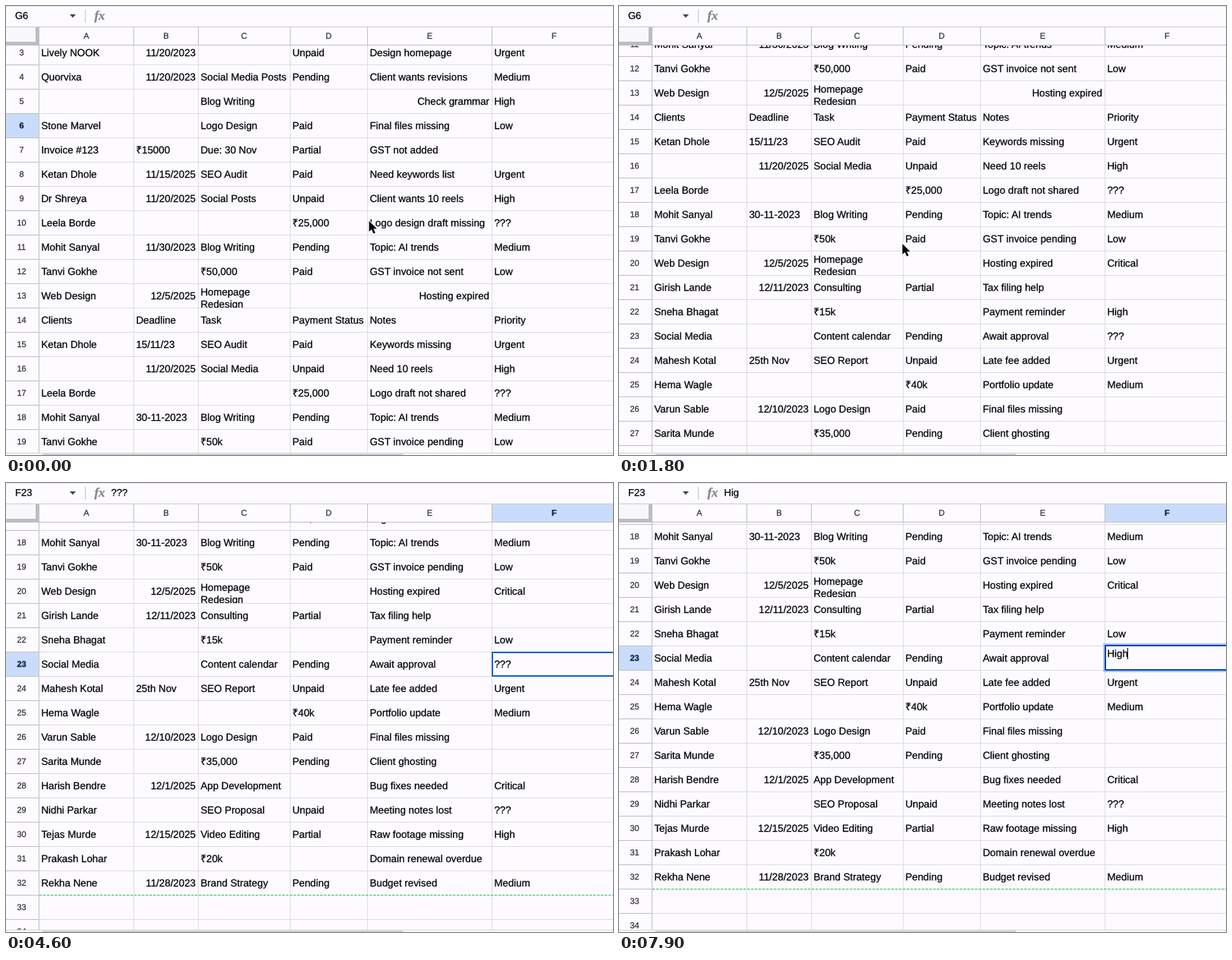
An HTML page with a canvas that plays this animation: 800 px wide and 591 px high, repeating every 8 s.

```html
<!DOCTYPE html>
<html lang="en">
<head>
<meta charset="utf-8">
<title>Client sheet</title>
<style>
  html, body { margin: 0; width: 100%; height: 100%; overflow: hidden; background: #fdfbff; }
  canvas { display: block; width: 800px; height: 591px; }
</style>
</head>
<body>
<canvas id="stage" width="800" height="591"></canvas>
<script>
const ctx = document.getElementById('stage').getContext('2d');
ctx.textRendering = 'geometricPrecision';
const W = 800, H = 591, LOOP = 8000, STEP = 100;
const ROW_H = 32, TOP = 52, BOTTOM = 588;
const SANS = '"Liberation Sans", Arial, sans-serif';
const CELL_FONT = '13.333px ' + SANS;
const BG = '#fdfbff', GRID = '#dddce0', EDGE = '#c0bfc3', ACTIVE = '#cadcfb', INK = '#000';
const edges = [43, 168, 253, 374, 476, 640, 804];

// Rows 3 and up: A | B | C | D | E | F. A leading ">" aligns right, "~" wraps.
const rows = `Lively NOOK|11/20/2023||Unpaid|Design homepage|Urgent
Quorvixa|11/20/2023|Social Media Posts|Pending|Client wants revisions|Medium
||Blog Writing||>Check grammar|High
Stone Marvel||Logo Design|Paid|Final files missing|Low
Invoice #123|₹15000|Due: 30 Nov|Partial|GST not added|
Ketan Dhole|11/15/2025|SEO Audit|Paid|Need keywords list|Urgent
Dr Shreya|11/20/2025|Social Posts|Unpaid|Client wants 10 reels|High
Leela Borde|||₹25,000|Logo design draft missing|???
Mohit Sanyal|11/30/2023|Blog Writing|Pending|Topic: AI trends|Medium
Tanvi Gokhe||₹50,000|Paid|GST invoice not sent|Low
Web Design|12/5/2025|Homepage~Redesign||>Hosting expired|
Clients|Deadline|Task|Payment Status|Notes|Priority
Ketan Dhole|15/11/23|SEO Audit|Paid|Keywords missing|Urgent
|11/20/2025|Social Media|Unpaid|Need 10 reels|High
Leela Borde|||₹25,000|Logo draft not shared|???
Mohit Sanyal|30-11-2023|Blog Writing|Pending|Topic: AI trends|Medium
Tanvi Gokhe||₹50k|Paid|GST invoice pending|Low
Web Design|12/5/2025|Homepage~Redesign||Hosting expired|Critical
Girish Lande|12/11/2023|Consulting|Partial|Tax filing help|
Sneha Bhagat||₹15k||Payment reminder|High
Social Media||Content calendar|Pending|Await approval|???
Mahesh Kotal|25th Nov|SEO Report|Unpaid|Late fee added|Urgent
Hema Wagle|||₹40k|Portfolio update|Medium
Varun Sable|12/10/2023|Logo Design|Paid|Final files missing|
Sarita Munde||₹35,000|Pending|Client ghosting|
Harish Bendre|12/1/2025|App Development||Bug fixes needed|Critical
Nidhi Parkar||SEO Proposal|Unpaid|Meeting notes lost|???
Tejas Murde|12/15/2025|Video Editing|Partial|Raw footage missing|High
Prakash Lohar||₹20k||Domain renewal overdue|
Rekha Nene|11/28/2023|Brand Strategy|Pending|Budget revised|Medium`
  .split('\n').map(line => line.split('|'));

// [time, value...]
const scrollKeys = [[0, 0], [500, 142], [900, 200], [1800, 267], [2100, 375], [2400, 463],
  [4800, 463], [5200, 467], [5600, 471]];
const mouseKeys = [[0, 478, 283], [500, 242, 291], [900, 252, 296], [1800, 373, 313], [2500, 400, 316],
  [3000, 675, 201], [4800, 678, 201], [5200, 695, 204], [5800, 696, 226], [6900, 696, 226], [7100, 697, 219]];

// [time, text in the edited cell, selected]
const edits = [
  { row: 22, from: 3400, to: 4500, keys: [[3400, 'High'], [3500, 'High', true], [4000, 'L'], [4100, 'Lo'], [4300, 'Low']] },
  { row: 23, from: 7300, to: LOOP, keys: [[7300, '???'], [7400, '???', true], [7600, 'H'], [7700, 'Hi'], [7800, 'Hig'], [7900, 'High']] }
];

function track(keys, t) {
  const i = keys.findIndex(k => k[0] > t);
  if (i < 0) return keys[keys.length - 1].slice(1);
  const a = keys[i - 1], b = keys[i], p = (t - a[0]) / (b[0] - a[0]);
  return a.slice(1).map((v, n) => v + (b[n + 1] - v) * p);
}

const latest = (keys, t) => keys.filter(k => k[0] <= t).pop() || keys[0];

function rect(x, y, w, h, color) {
  ctx.fillStyle = color;
  ctx.fillRect(x, y, w, h);
}

// A hairline stroke gives the slightly heavy, smoothed look of the sheet's type.
function text(str, x, y, font = CELL_FONT, align = 'left', color = INK) {
  ctx.font = font;
  ctx.textAlign = align;
  ctx.fillStyle = ctx.strokeStyle = color;
  ctx.lineWidth = 0.25;
  ctx.lineJoin = 'round';
  ctx.fillText(str, x, y);
  ctx.strokeText(str, x, y);
}

function clipped(x, y, w, h, draw) {
  ctx.save();
  ctx.beginPath();
  ctx.rect(x, y, w, h);
  ctx.clip();
  draw();
  ctx.restore();
}

function drawCell(value, col, bottom) {
  const left = edges[col] + 3.4, right = edges[col + 1] - 3;
  if (value.includes('~')) {
    const [first, second] = value.split('~');
    clipped(edges[col], bottom - 31, 120, 31, () => {
      text(first, left, bottom - 16);
      text(second, left, bottom);
    });
  } else if (value[0] === '>') {
    text(value.slice(1), right, bottom - 11, CELL_FONT, 'right');
  } else if (/\/20\d\d$/.test(value)) {
    text(value, right, bottom - 11, CELL_FONT, 'right');
  } else {
    text(value, left, bottom - 11);
  }
}

function drawGrid(scroll, active, edit, priority) {
  const bottomOf = n => ROW_H * n - 19 - scroll;
  for (let n = 2; n <= 36; n++) {
    const y = bottomOf(n);
    if (y < TOP - 2 || y > BOTTOM + ROW_H) continue;
    const on = n === active;
    if (on) rect(0, y - 31, 43, 31, ACTIVE);
    text(n, 20.5, y - 12, (on ? 'bold ' : '') + '11px ' + SANS, 'center', on ? '#041e49' : '#333');
    rect(0, y, 43, 1, EDGE);
    rect(43, y, W - 43, 1, GRID);
  }
  edges.slice(1, 6).forEach(x => rect(x, TOP, 1, BOTTOM - TOP, GRID));
  rect(43, TOP, 1, BOTTOM - TOP, EDGE);

  rows.forEach((cells, i) => {
    const n = i + 3, y = bottomOf(n);
    if (y < TOP || y > BOTTOM + ROW_H) return;
    cells.forEach((value, col) => {
      if (col === 5 && edit && edit.row === n) return;
      drawCell(col === 5 && n === 22 ? priority : value, col, y);
    });
  });

  const dashY = bottomOf(32);
  rect(44, dashY, W - 44, 1, BG);
  for (let x = 44; x < W; x += 5) rect(x, dashY, 3.5, 1, '#2fc25c');

  if (active > 6) drawSelection(bottomOf(active - 1), edit);
}

function drawSelection(top, edit) {
  ctx.lineWidth = 2;
  if (!edit) {
    ctx.strokeStyle = '#1b62cc';
    ctx.strokeRect(641, top + 1, 180, 31);
    return;
  }
  rect(638, top - 3, 170, 38, '#a9c8fa');
  rect(640, top - 1, 170, 34, BG);
  ctx.strokeStyle = '#0d47b5';
  ctx.strokeRect(641, top, 180, 32);
  ctx.font = CELL_FONT;
  ctx.textAlign = 'left';
  const width = ctx.measureText(edit.value).width;
  if (edit.selected) rect(643.5, top + 3, width + 1, 15, '#b4d5fd');
  text(edit.value, 643.4, top + 15);
  if (!edit.selected) rect(Math.round(643.4 + width) - 1, top + 3, 1, 15, INK);
}

function drawHeader(name, formula, columnOn) {
  rect(0, 0, W, TOP, BG);
  rect(0, 0, W, 1, '#e6e5e9');
  const bar = '13px ' + SANS;
  text(name, 12, 17, bar);
  text(formula, 138.5, 17, bar);
  ctx.fillStyle = '#444';
  ctx.beginPath();
  ctx.moveTo(84, 11);
  ctx.lineTo(92, 11);
  ctx.lineTo(88, 15.5);
  ctx.fill();
  rect(104, 5, 1, 17, '#c4c3c7');
  const fx = 'italic bold 17px "Liberation Serif", Times, serif';
  text('f', 116.5, 18, fx, 'left', '#85848a');
  text('x', 122, 18, fx, 'left', '#85848a');

  if (columnOn) rect(641, 28, 160, 23, ACTIVE);
  rect(0, 27, W, 1, '#cbcace');
  rect(0, 51, W, 1, EDGE);
  [...'ABCDEF'].forEach((letter, i) => {
    const bold = columnOn && i === 5;
    text(letter, (edges[i] + edges[i + 1]) / 2 + 0.3, 43, (bold ? 'bold ' : '') + '11px ' + SANS, 'center', bold ? '#041e49' : '#333');
    if (i) rect(edges[i], 28, 1, 24, EDGE);
  });
  rect(0, 28, 39, 19, '#f8f7fb');
  rect(39, 28, 5, 24, '#bdbcc0');
  rect(0, 47, 44, 5, '#bdbcc0');
}

function drawFooter() {
  rect(0, BOTTOM, W, 3, '#f9f8fb');
  rect(0, BOTTOM, W, 1, '#d5d4d8');
  rect(48, 589.5, 475, 1.5, '#c9c8cc');
}

function drawArrow(x, y) {
  ctx.save();
  ctx.translate(x, y);
  ctx.beginPath();
  [[0.5, 0], [0.5, 14], [3.8, 11], [6.2, 16.6], [8.7, 15.5], [6.3, 10.2], [10.8, 10.2]]
    .forEach(p => ctx.lineTo(...p));
  ctx.closePath();
  ctx.lineJoin = 'round';
  ctx.lineWidth = 2;
  ctx.strokeStyle = '#fff';
  ctx.stroke();
  ctx.fillStyle = INK;
  ctx.fill();
  ctx.restore();
}

function drawBeam(x, y) {
  const path = () => {
    ctx.beginPath();
    ctx.moveTo(x - 3.5, y - 7.5);
    ctx.quadraticCurveTo(x, y - 7.5, x, y - 5);
    ctx.lineTo(x, y + 5);
    ctx.quadraticCurveTo(x, y + 7.5, x - 3.5, y + 7.5);
    ctx.moveTo(x + 3.5, y - 7.5);
    ctx.quadraticCurveTo(x, y - 7.5, x, y - 5);
    ctx.moveTo(x, y + 5);
    ctx.quadraticCurveTo(x, y + 7.5, x + 3.5, y + 7.5);
    ctx.moveTo(x - 2, y + 2.5);
    ctx.lineTo(x + 2, y + 2.5);
  };
  [['#fff', 3], ['#111', 1.2]].forEach(([color, width]) => {
    ctx.strokeStyle = color;
    ctx.lineWidth = width;
    path();
    ctx.stroke();
  });
}

function drawMouse(t, edit) {
  const [x, y] = track(mouseKeys, t);
  const typing = (t >= 4000 && t < 4800) || t >= 7600;
  if (typing) return;
  if (edit) drawBeam(x, y);
  else drawArrow(x, y);
}

function render(t) {
  const scroll = Math.round(track(scrollKeys, t)[0]);
  const active = t < 3000 ? 6 : t < 4500 ? 22 : 23;
  const session = edits.find(e => t >= e.from && t < e.to);
  let edit = null;
  let formula = active === 6 ? '' : active === 22 ? 'High' : '???';
  if (session) {
    const [, value, selected] = latest(session.keys, t);
    edit = { row: session.row, value, selected };
    formula = latest(session.keys, t - STEP)[1]; // the formula bar trails the cell
  }

  rect(0, 0, W, H, BG);
  clipped(0, TOP, W, BOTTOM - TOP, () => drawGrid(scroll, active, edit, t < 4500 ? 'High' : 'Low'));
  drawHeader(active === 6 ? 'G6' : 'F' + active, formula, active !== 6);
  drawFooter();
  drawMouse(t, edit);
}

const start = performance.now();
function tick() {
  const t = (performance.now() - start) % LOOP;
  render(Math.floor(t / STEP) * STEP);
  requestAnimationFrame(tick);
}
tick();
</script>
</body>
</html>
```
